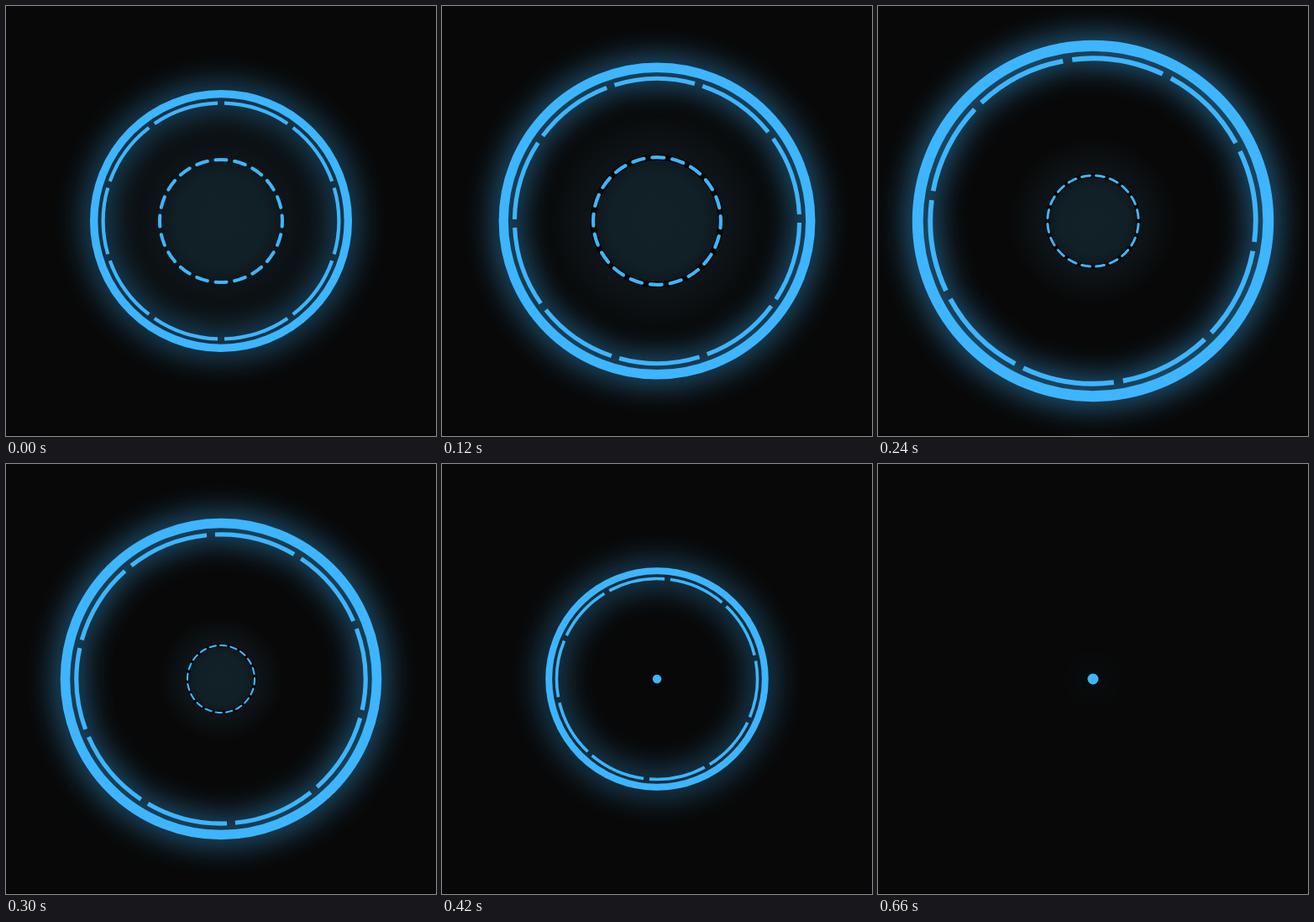
Animation of 512 by 512 pixels, one loop 720 ms. Source, as an HTML page:

```html
<!DOCTYPE html>
<html lang="en">
<head>
<meta charset="utf-8">
<title>Pulse ring</title>
<style>
  html, body { margin: 0; width: 100%; height: 100%; overflow: hidden; background: #080808; }
  svg { display: block; width: 100vw; height: 100vh; }
  #glow { filter: blur(19px); }
</style>
</head>
<body>
<svg viewBox="0 0 512 512">
  <defs>
    <radialGradient id="haloFill">
      <stop offset="0" stop-color="#10191e"/>
      <stop offset=".55" stop-color="#0e1519"/>
      <stop offset=".78" stop-color="#0b0f11"/>
      <stop offset="1" stop-color="#080808"/>
    </radialGradient>
    <radialGradient id="discFill">
      <stop offset="0" stop-color="#112127"/>
      <stop offset=".75" stop-color="#112026"/>
      <stop offset="1" stop-color="#0e181d"/>
    </radialGradient>
  </defs>
  <rect width="512" height="512" fill="#080808"/>
  <g transform="translate(256 256)">
    <circle id="halo" fill="url(#haloFill)"/>
    <g id="glow"></g>
    <circle id="disc" fill="url(#discFill)"/>
    <g id="sharp"></g>
  </g>
  <rect y="511" width="512" height="1" fill="#030202"/>
</svg>
<script>
const LOOP = 720, STEP = 60, BLUE = '#3eb5ff', DOT = 6.5;
const $ = id => document.getElementById(id);

function set(el, attrs) {
  for (const name in attrs) el.setAttribute(name, attrs[name]);
}

function circle(parent, stroke) {
  const el = document.createElementNS('http://www.w3.org/2000/svg', 'circle');
  set(el, { fill: 'none', stroke, pathLength: 360 });
  return parent.appendChild(el);
}

function place(el, r, width, turn = 0) {
  set(el, {
    r: Math.max(r, 0), 'stroke-width': width, transform: `rotate(${turn - 90})`,
    visibility: r > 0 ? 'visible' : 'hidden'
  });
}

// Dashes in degrees; offset moves the start of the pattern
function dash(el, on, off, offset) {
  set(el, { 'stroke-dasharray': off ? `${on} ${off}` : 'none', 'stroke-dashoffset': offset });
}

const curve = (x, start, slope, bend) => start + slope * x + bend * x * x;

const layers = [$('glow'), $('sharp')];
const rings = layers.map(g => circle(g, BLUE));
const segments = layers.map(g => circle(g, BLUE));
const rim = circle($('sharp'), '#050606');
const dashes = circle($('sharp'), BLUE);

function drawOuter(edge, turn) {
  const width = Math.max(DOT, edge * 0.06);
  rings.forEach(el => place(el, edge - width / 2, width));

  const gap = edge > 62 ? 3.3 : 0;
  segments.forEach(el => {
    place(el, Math.min(edge * 0.9, edge - 11), edge * 0.027, turn);
    dash(el, 36 - gap, gap, -gap / 2);
  });
  $('glow').style.opacity = Math.min(0.95, 0.3 + edge / 80);
}

function drawInner(edge, turn, rimAlpha) {
  const open = edge > 10;
  const width = open ? edge * 0.054 : edge;
  const r = edge - width / 2;
  set($('halo'), { r: open ? r * 1.85 : 0 });
  set($('disc'), { r: open ? r : 0 });
  place(rim, open ? r : 0, width * 1.7);
  set(rim, { opacity: rimAlpha });
  place(dashes, r, width, turn);
  set(dashes, { 'stroke-linecap': open ? 'round' : 'butt' });
  const on = 10.4;
  dash(dashes, on, open ? 18 - on : 0, on / 2);
}

function draw(n) {
  // Both circles swell, then collapse; the inner one runs ahead
  const outer = Math.min(curve(n, 156, 17.6, -0.7), curve(n - 4, 215.2, -22.2, -1.76));
  const inner = Math.min(75 + 11 * n, curve(n - 2, 78, -8.9, -1.13));
  const turn = Math.min(9 * n, 7 + 5 * n);
  drawOuter(Math.max(outer, DOT), turn);
  drawInner(Math.max(inner, 0), -turn, Math.min(n, 1));
}

const start = performance.now();
function tick() {
  draw(Math.floor((performance.now() - start) % LOOP / STEP));
  requestAnimationFrame(tick);
}
tick();
</script>
</body>
</html>
```
